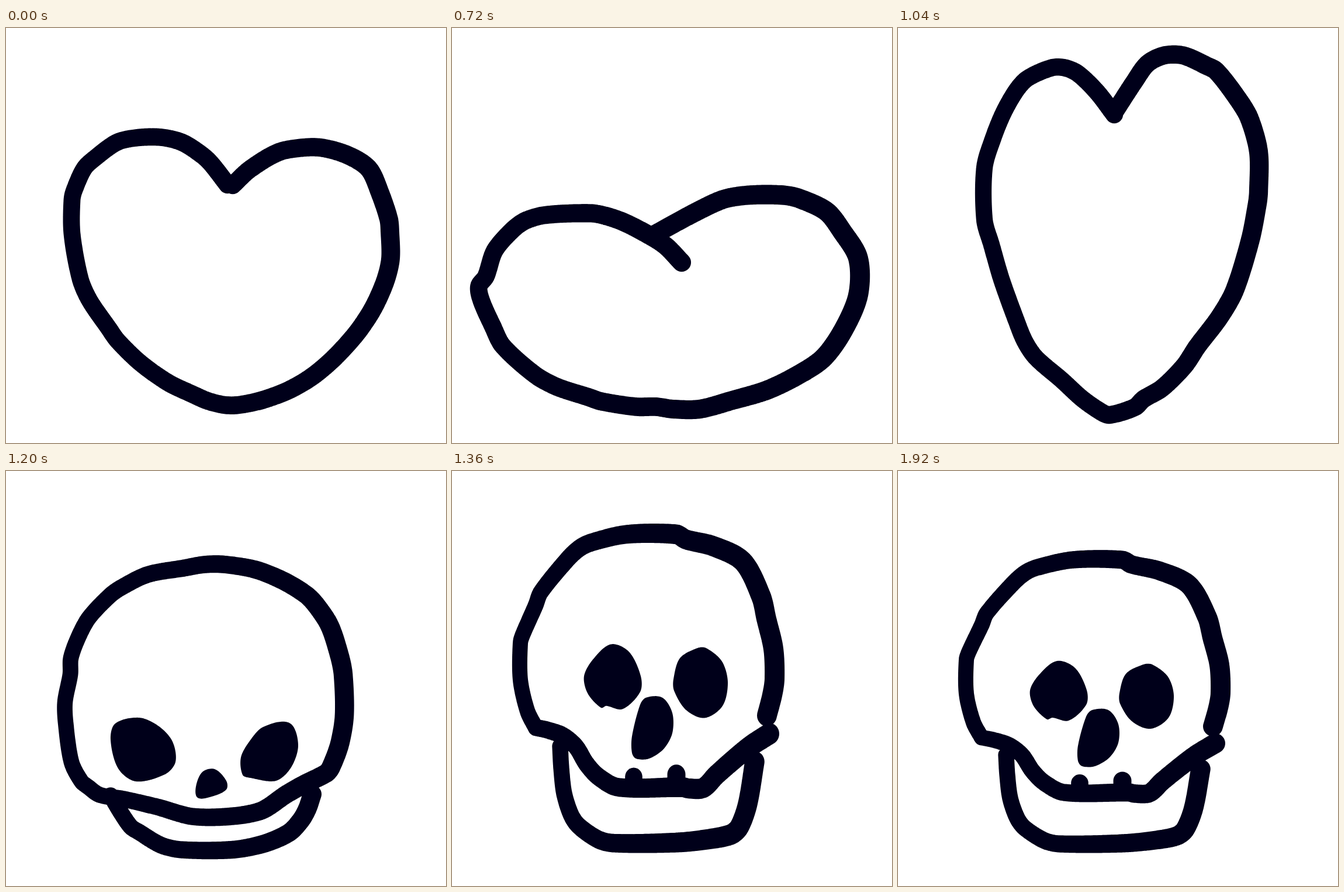
An HTML page for the animation above (2240 ms loop, 753x710 px).

```html
<!DOCTYPE html>
<html lang="en">
<head>
<meta charset="utf-8">
<title>Beating heart and skull</title>
<style>
  html, body { margin: 0; width: 100%; height: 100%; overflow: hidden; background: #fff; }
  svg { display: block; width: 100%; height: 100%; }
</style>
</head>
<body>
<svg viewBox="0 0 753 710"><path id="ink" fill="#00001a"/></svg>
<script>
const LOOP = 2240;
const SKULL_BASE = 653;
const SKULL_STRETCH = 561 / 516;

// Samples a smooth curve through the points.
function curve(text, closed) {
  const pts = text.trim().split(/\s+/).map(p => p.split(',').map(Number));
  const n = pts.length;
  const at = i => closed ? pts[(i + n) % n] : pts[Math.max(0, Math.min(n - 1, i))];
  const handle = (i, length) => {
    const [ax, ay] = at(i - 1), [bx, by] = at(i + 1);
    const k = length / (Math.hypot(bx - ax, by - ay) || 1);
    return [(bx - ax) * k, (by - ay) * k];
  };
  const out = [];
  for (let i = 0; i < (closed ? n : n - 1); i++) {
    const a = at(i), b = at(i + 1);
    const length = Math.hypot(b[0] - a[0], b[1] - a[1]);
    const u = handle(i, length * 0.3), v = handle(i + 1, length * 0.3);
    const steps = Math.ceil(length / 2);
    for (let s = 0; s <= steps; s++) {
      const t = s / steps, q = 1 - t;
      out.push([0, 1].map(k =>
        q * q * q * a[k] + 3 * q * q * t * (a[k] + u[k]) +
        3 * q * t * t * (b[k] - v[k]) + t * t * t * b[k]));
    }
  }
  return out;
}

// A round brush whose width grows from left to right.
function brush(base, growth) {
  return (text, closed) => curve(text, closed).map(([x, y]) => {
    const r = (base + growth * x) / 2;
    return `M${(x - r).toFixed(2)},${y.toFixed(2)}a${r},${r} 0 1 1 ${2 * r},0a${r},${r} 0 1 1 ${-2 * r},0z`;
  }).join('');
}

const blob = text => 'M' + curve(text, true).map(p => p.map(v => v.toFixed(2))).join('L') + 'Z';

const restHeart = brush(28.4, 0.0055)(
  `379,268 351,232 335,217 302,196 265,187 222,188 189,196 153,222 134,240 117,277 113,294
   113,352 127,429 143,466 176,514 191,535 230,573 278,607 320,627 345,638 374,645 398,645
   437,637 483,620 523,597 561,565 600,522 628,480 649,433 658,395 657,348 655,327
   640,282 621,241 586,218 541,205 505,205 465,213 417,242 388,269`);

const squashedHeart = brush(29.6, 0.0065)(
  `393,401 366,373 340,356 296,333 265,322 238,317 160,320 125,330 103,346 73,381 58,425
   46,442 50,466 70,511 87,544 143,594 180,614 235,632 256,639 315,648 350,648 378,652
   424,652 480,637 538,620 590,595 635,565 669,518 695,457 695,394 667,347 641,314
   595,292 567,286 508,286 465,293 417,315 345,354`);

const stretchedHeart = brush(27.2, 0.0085)(
  `370,148 341,110 308,78 285,68 263,68 222,86 203,106 181,144 163,188 148,239 148,328
   160,371 177,430 203,502 217,536 236,564 280,602 315,634 348,657 362,662 405,649 420,635
   452,616 490,578 512,545 550,495 576,449 603,362 615,300 617,280 617,212 601,154
   580,119 545,74 527,64 488,47 455,47 427,61 405,91 370,145`);

const roundBrush = brush(25.5, 0.0125);
const roundHead = roundBrush(
  `129,531 112,498 102,430 101,395 110,348 111,320 124,284 142,251 178,213 198,199 243,177
   305,166 340,160 375,160 428,169 475,188 514,212 532,231 554,265 571,317 577,348 579,418
   571,467 556,507 548,517 510,536 480,553 437,581 383,591 318,591 260,575 200,561
   160,554 140,540`, true);
const roundJaw = roundBrush(
  `179,555 197,585 214,609 228,618 265,640 300,648 387,648 440,638 484,619 505,597 516,577 524,553`);
const roundEyes =
  blob('179,460 187,432 228,422 262,437 285,463 290,498 272,519 222,531 192,509') +
  blob('402,490 417,462 440,438 485,431 500,468 488,507 462,530 418,525 405,520');
const roundNose = blob('325,540 336,515 357,510 377,530 377,545 352,557 328,559');

const skullBrush = brush(24, 0.0185);
const skullHead = skullBrush(
  `539,437 548,405 552,380 550,332 538,285 529,250 498,195 448,171 400,160 384,152 299,152
   238,165 218,174 198,191 152,243 143,264 121,310 117,323 117,381 129,430 143,456`);
const skullLip = skullBrush(
  `143,456 163,460 190,469 212,486 230,513 250,533 284,550 395,550 405,552 430,551 452,531
   484,505 511,485 543,466`);
const skullJaw = skullBrush(
  `185,486 187,520 192,560 204,594 217,611 250,632 276,638 385,637 445,631 478,624 492,612
   506,576 518,510`);
const skullTeeth = skullBrush('311,534 311,542') + skullBrush('384,530 384,540');
const skullEyes =
  blob('226,375 242,348 272,325 303,337 323,375 322,400 292,427 264,422 255,425 232,402') +
  blob('379,380 390,347 420,331 435,331 462,352 472,385 463,422 432,441 400,428 380,398');
const skullNose = blob('308,470 322,420 332,409 360,409 377,433 377,465 362,490 337,505 315,505 308,496');

const roundSkull = roundHead + roundJaw + roundEyes + roundNose;
const skull = skullHead + skullLip + skullJaw + skullTeeth + skullEyes + skullNose;
const stretch = `translate(0 ${SKULL_BASE * (1 - SKULL_STRETCH)}) scale(1 ${SKULL_STRETCH})`;

const poses = [
  { until: 720, d: restHeart },
  { until: 1040, d: squashedHeart },
  { until: 1200, d: stretchedHeart },
  { until: 1280, d: roundSkull },
  { until: 1360, d: skull },
  { until: 1440, d: skull, transform: stretch },
  { until: LOOP, d: skull }
];

const ink = document.getElementById('ink');
let shown;

function draw(time) {
  const pose = poses.find(p => time < p.until);
  if (pose === shown) return;
  shown = pose;
  ink.setAttribute('d', pose.d);
  ink.setAttribute('transform', pose.transform || '');
}

const start = performance.now();
function tick() {
  draw((performance.now() - start) % LOOP);
  requestAnimationFrame(tick);
}
tick();
</script>
</body>
</html>
```
